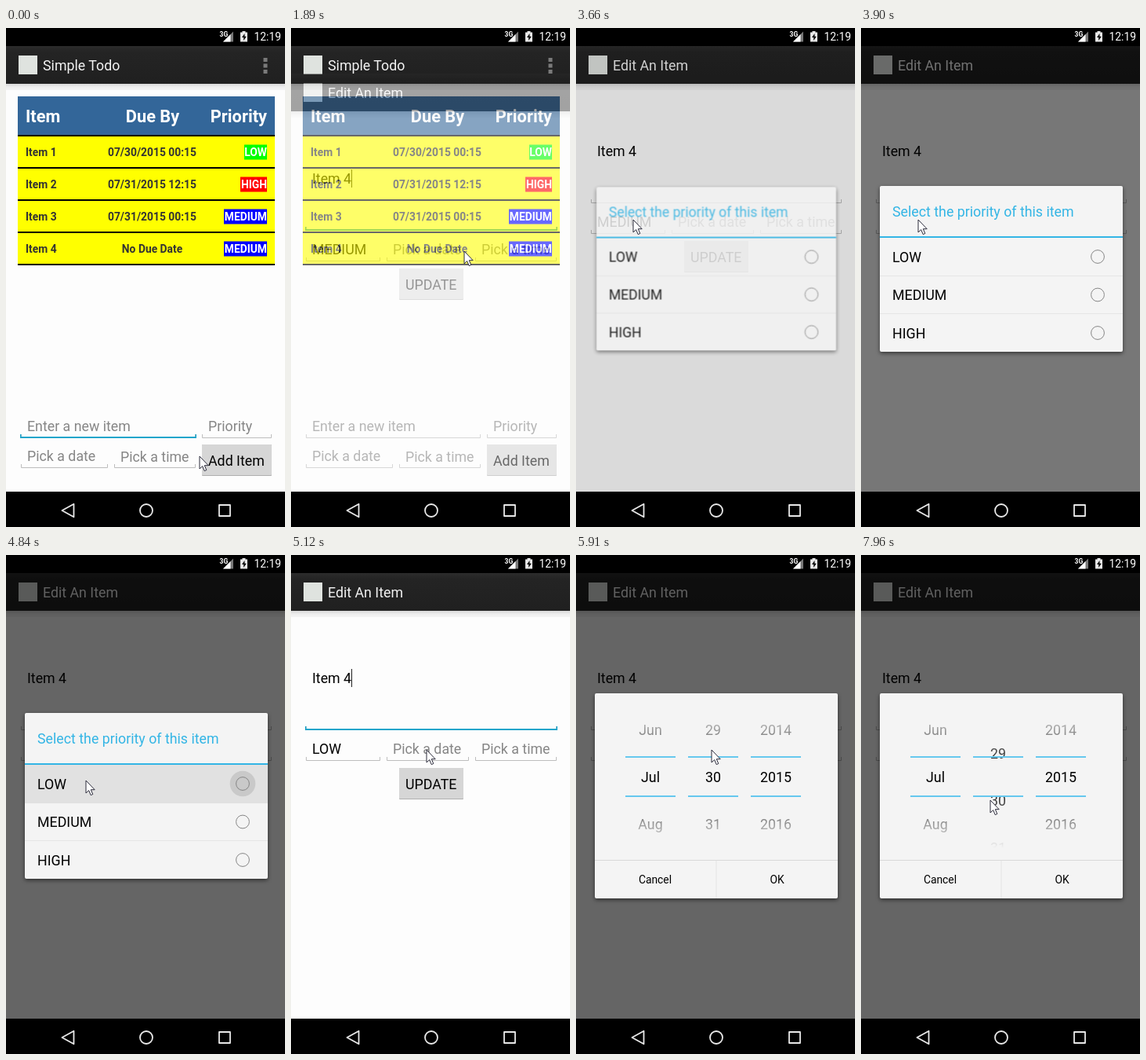
An HTML page for the animation above (8000 ms loop, 356 by 635 pixels).

```html
<!DOCTYPE html>
<html lang="en">
<head>
<meta charset="utf-8">
<title>Todo list demo</title>
<style>
  html, body { margin: 0; width: 100%; height: 100%; overflow: hidden; background: #000; }
  svg { display: block; width: 356px; height: 635px; font-family: Roboto, "Open Sans", sans-serif; }
  text { white-space: pre; }
  .dialog { filter: drop-shadow(0 2px 2.5px rgba(0, 0, 0, .55)); transform-origin: 179px 306.5px; }
</style>
</head>
<body>
<svg id="stage" viewBox="0 0 356 635" xmlns="http://www.w3.org/2000/svg"></svg>
<script>
const LOOP = 8000;
const HINT = '#868686', CYAN = '#33b5e5';

// ---- drawing helpers ----
const rect = (x, y, w, h, fill, more = '') =>
  `<rect x="${x}" y="${y}" width="${w}" height="${h}" fill="${fill}" ${more}/>`;
const text = (x, y, str, { fill = '#000', size = 17.8, weight = 400, anchor = 'start', id = '' } = {}) =>
  `<text x="${x}" y="${y}" fill="${fill}" font-size="${size}" font-weight="${weight}"
    text-anchor="${anchor}" ${id && `id="${id}"`}>${str}</text>`;
const group = (id, body, more = '') => `<g id="${id}" ${more}>${body}</g>`;
const underline = (x1, x2, y) =>
  `<path d="M${x1 + .5} ${y - 4}V${y + .5}H${x2 - .5}V${y - 4}" fill="none" stroke="#bdbdbd"/>`;
const focusLine = (id, x1, x2, y) =>
  `<path id="${id}" d="M${x1} ${y - 4}H${x1 + 1.5}V${y - 1}H${x2 - 1.5}V${y - 4}H${x2}V${y + 1}H${x1}Z" fill="#1fa5cb"/>`;
const button = (x, y, w, label) =>
  rect(x, y, w, 40, '#b0b0b0', 'rx="1"') + rect(x, y, w, 39, '#d6d6d6', 'rx="1"') +
  text(x + 8, y + 26.5, label);

// ---- screens ----
const appBar = title =>
  rect(0, 23, 356, 567, '#fdfdfd') +
  rect(0, 71, 356, 8, 'url(#shade)') +
  rect(0, 23, 356, 48, 'url(#bar)') +
  rect(16, 35, 24, 24, '#dfe3df') +
  text(47, 54, title, { fill: '#f3f3f3' });

function tableRow([name, due, priority, color, width], i) {
  const y = 138 + i * 41;
  const cell = { size: 13.85, weight: 700, fill: '#333' };
  return rect(15, y, 328, 39, '#ff0') + rect(15, y + 39, 328, 2, '#000') +
    text(25, y + 25, name, cell) +
    text(186.5, y + 25, due, { ...cell, anchor: 'middle' }) +
    rect(333 - width, y + 10.5, width, 19, color) +
    text(333, y + 25, priority, { ...cell, fill: '#fff', anchor: 'end' });
}

function listScreen() {
  const head = { size: 21.8, weight: 700, fill: '#fff' };
  const rows = [
    ['Item 1', '07/30/2015 00:15', 'LOW', '#0f0', 29],
    ['Item 2', '07/31/2015 12:15', 'HIGH', '#f00', 34],
    ['Item 3', '07/31/2015 00:15', 'MEDIUM', '#00f', 55],
    ['Item 4', 'No Due Date', 'MEDIUM', '#00f', 55]
  ];
  return appBar('Simple Todo') +
    [38, 45.5, 53].map(y => rect(328.5, y, 5, 5, '#7a7a7a')).join('') +
    rect(15, 87, 328, 49, '#336699') + rect(15, 136, 328, 2, '#000') +
    text(25, 120, 'Item', head) +
    text(187, 120, 'Due By', { ...head, anchor: 'middle' }) +
    text(333, 120, 'Priority', { ...head, anchor: 'end' }) +
    rows.map(tableRow).join('') +
    underline(19, 242, 521) + focusLine('listFocus', 18, 243, 521) +
    text(27, 513, 'Enter a new item', { fill: HINT }) +
    underline(250, 339, 521) + text(258, 513, 'Priority', { fill: HINT }) +
    underline(19, 130, 559) + text(27, 551, 'Pick a date', { fill: HINT }) +
    underline(138, 242, 559) + text(146, 552, 'Pick a time', { fill: HINT }) +
    button(250, 530, 89, 'Add Item');
}

const editScreen = () =>
  appBar('Edit An Item') +
  text(27, 163, 'Item 4') +
  group('caret', rect(77, 145, 1, 23, '#222')) +
  underline(19, 339, 222) + focusLine('editFocus', 18, 340, 222) +
  underline(19, 114, 261) +
  text(27, 253, 'MEDIUM', { id: 'oldPriority' }) + text(27, 253, 'LOW', { id: 'newPriority' }) +
  underline(122, 227, 261) + text(130, 253, 'Pick a date', { fill: HINT }) +
  underline(235, 339, 261) + text(243, 253, 'Pick a time', { fill: HINT }) +
  button(138, 271, 82, 'UPDATE');

function priorityDialog() {
  const option = (label, i) => {
    const y = 291 + i * 48.5;
    return text(40, y + 6.5, label) +
      `<circle cx="302" cy="${y}" r="8.4" fill="none" stroke="#858585"/>`;
  };
  return rect(24, 201, 310, 211, '#f4f4f4', 'rx="2"') +
    text(40, 240, 'Select the priority of this item', { fill: CYAN }) +
    rect(24, 315, 310, 1, '#e6e6e6') + rect(24, 363, 310, 1, '#e6e6e6') +
    group('press', rect(24, 267, 310, 49, '#e1e1e1') +
      '<circle cx="302" cy="291" r="16.3" fill="#c9c9c9"/>') +
    rect(24, 265, 310, 2, CYAN) +
    ['LOW', 'MEDIUM', 'HIGH'].map(option).join('');
}

function dateDialog() {
  const wheel = (x, items) => items.map((s, i) =>
    text(x, 229 + i * 60, s, { anchor: 'middle' })).join('');
  const bars = [63, 143, 223].map(x =>
    rect(x, 256, 64, 2, '#66c8ee') + rect(x, 306, 64, 2, '#66c8ee')).join('');
  const small = { size: 13.85, anchor: 'middle' };
  return rect(24, 176, 310, 261, '#f4f4f4', 'rx="2"') +
    group('wheels',
      wheel(95, ['Jun', 'Jul', 'Aug']) +
      group('days', wheel(175, [29, 30, 31])) +
      wheel(255, [2014, 2015, 2016]), 'mask="url(#fade)"') +
    bars +
    rect(24, 388, 310, 1, '#d9d9d9') + rect(178.5, 389, 1, 48, '#e3e3e3') +
    text(101, 418, 'Cancel', small) + text(256.5, 418, 'OK', small);
}

const systemBars = () =>
  rect(0, 0, 356, 23, '#000') + rect(0, 590, 356, 45, '#000') +
  text(272.5, 10.5, '3G', { size: 8.5, weight: 700, fill: '#fff' }) +
  '<path d="M290 4.500V17.500H277Z" fill="#777"/><path d="M286.500 8V17.500H277Z" fill="#fff"/>' +
  '<path d="M301.500 4h4v1.500h2.500v12h-9v-12h2.500z" fill="#e8e8e8"/>' +
  '<path d="M304.500 7l-3.500 5h2.200v4l3.600-5.200h-2.300z" fill="#000"/>' +
  text(351, 16, '12:19', { size: 13.85, fill: '#fff', anchor: 'end' }) +
  `<g fill="none" stroke="#e8e8e8" stroke-width="1.800" stroke-linejoin="round">
    <path d="M71.500 614L86.500 605.700V622.300Z"/><circle cx="179" cy="614" r="8"/>
    <rect x="272" y="607" width="14" height="14"/></g>`;

const defs = `<defs>
  <linearGradient id="bar" x2="0" y2="1"><stop stop-color="#2c2c2c"/><stop offset=".15" stop-color="#242424"/>
    <stop offset="1" stop-color="#202020"/></linearGradient>
  <linearGradient id="shade" x2="0" y2="1"><stop stop-color="#d6d6d6"/><stop offset=".5" stop-color="#ededed"/>
    <stop offset="1" stop-color="#f5f5f5"/></linearGradient>
  <linearGradient id="edges" x2="0" y2="1"><stop stop-color="#fff" stop-opacity="0"/><stop offset=".45" stop-color="#fff"/>
    <stop offset=".55" stop-color="#fff"/><stop offset="1" stop-color="#fff" stop-opacity="0"/></linearGradient>
  <mask id="fade" maskUnits="userSpaceOnUse" x="24" y="193" width="310" height="180"
    style="mask-type:alpha">${rect(24, 193, 310, 180, 'url(#edges)')}</mask>
</defs>`;

document.getElementById('stage').innerHTML = defs +
  group('list', listScreen()) +
  group('edit', editScreen()) +
  group('dim', rect(0, 23, 356, 567, '#000')) +
  group('priority', priorityDialog(), 'class="dialog"') +
  group('date', dateDialog(), 'class="dialog"') +
  systemBars() +
  group('pointer', `<path d="M0 0V16L3.700 12.600 6.200 18.600 8.800 17.500 6.300 11.700H11.200Z"
    fill="#fff" stroke="#2a2a3a" stroke-linejoin="round"/>`);

// ---- motion: each table row is [ms, value], held until the next ----
function steps(id, prop, table) {
  const frames = table.map(([ms, value]) =>
    ({ offset: ms / LOOP, [prop]: value, easing: 'steps(1, end)' }));
  frames.push({ offset: 1, [prop]: table[table.length - 1][1] });
  document.getElementById(id).animate(frames, { duration: LOOP, iterations: Infinity });
}
const shift = (x, y) => `translate(${x}px, ${y}px)`;

// Pointer stroke along a curve through a control point, in n held steps.
function stroke(start, end, n, [x0, y0], [cx, cy], [x1, y1]) {
  return Array.from({ length: n }, (_, i) => {
    const u = (i + 1) / n;
    const k = (1 - Math.cos(Math.PI * u)) / 2;
    const at = (a, c, b) => (1 - k) * (1 - k) * a + 2 * k * (1 - k) * c + k * k * b;
    return [start + (end - start) * (n > 1 ? i / (n - 1) : 0), shift(at(x0, cx, x1), at(y0, cy, y1))];
  });
}

steps('pointer', 'transform', [
  [0, shift(247, 545)],
  ...stroke(500, 1460, 8, [247, 545], [294, 410], [221, 284]),
  ...stroke(2460, 3360, 8, [221, 284], [150, 262], [73, 244]),
  ...stroke(4070, 4580, 5, [73, 244], [84, 272], [102, 287]),
  [4990, shift(134, 270)],
  [5120, shift(173, 248)],
  ...stroke(6060, 6460, 4, [173, 248], [160, 266], [148, 287]),
  ...stroke(6600, 6840, 3, [148, 287], [186, 345], [231, 391]),
  ...stroke(7130, 7540, 4, [231, 391], [186, 330], [165, 280]),
  ...stroke(7680, 7960, 3, [165, 280], [165, 296], [165, 312])
]);

// Edit screen slides up and fades in.
const OPEN = 1865;
const opening = [1890, 2010, 2160].map(ms => [ms, ms - OPEN]);
steps('edit', 'opacity', [[0, 0],
  ...opening.map(([ms, d]) => [ms, 1 - Math.pow(Math.max(0, 1 - d / 200), 4)])]);
steps('edit', 'transform', [[0, shift(0, 51)],
  ...opening.map(([ms, d]) => [ms, shift(0, Math.round(51 * Math.pow(1 - d / 350, 5)))])]);

steps('listFocus', 'opacity', [[0, 1], [1770, 0]]);
steps('editFocus', 'opacity', [[0, 1], [3660, 0], [5120, 1], [5520, 0]]);
steps('caret', 'opacity', [[0, 1], [2590, 0], [3100, 1], [3660, 0], [5120, 1], [5520, 0]]);
steps('oldPriority', 'opacity', [[0, 1], [4990, 0]]);
steps('newPriority', 'opacity', [[0, 0], [4990, 1]]);

steps('dim', 'opacity', [[0, 0], [3660, .137], [3780, .53], [3930, .6], [4990, .3], [5120, 0],
  [5520, .137], [5650, .53], [5780, .6]]);
steps('priority', 'opacity', [[0, 0], [3660, .85], [3780, 1], [4990, .4], [5120, 0]]);
steps('priority', 'transform', [[0, 'scale(.987)'], [3780, 'scale(1)'], [4990, 'scale(.98)']]);
steps('press', 'opacity', [[0, 0], [4840, 1]]);
steps('date', 'opacity', [[0, 0], [5520, .85], [5650, 1]]);
steps('date', 'transform', [[0, 'scale(.987)'], [5650, 'scale(1)']]);
steps('days', 'transform', [[0, shift(0, 0)], [7680, shift(0, 6)], [7820, shift(0, 18)], [7960, shift(0, 30)]]);
</script>
</body>
</html>
```
